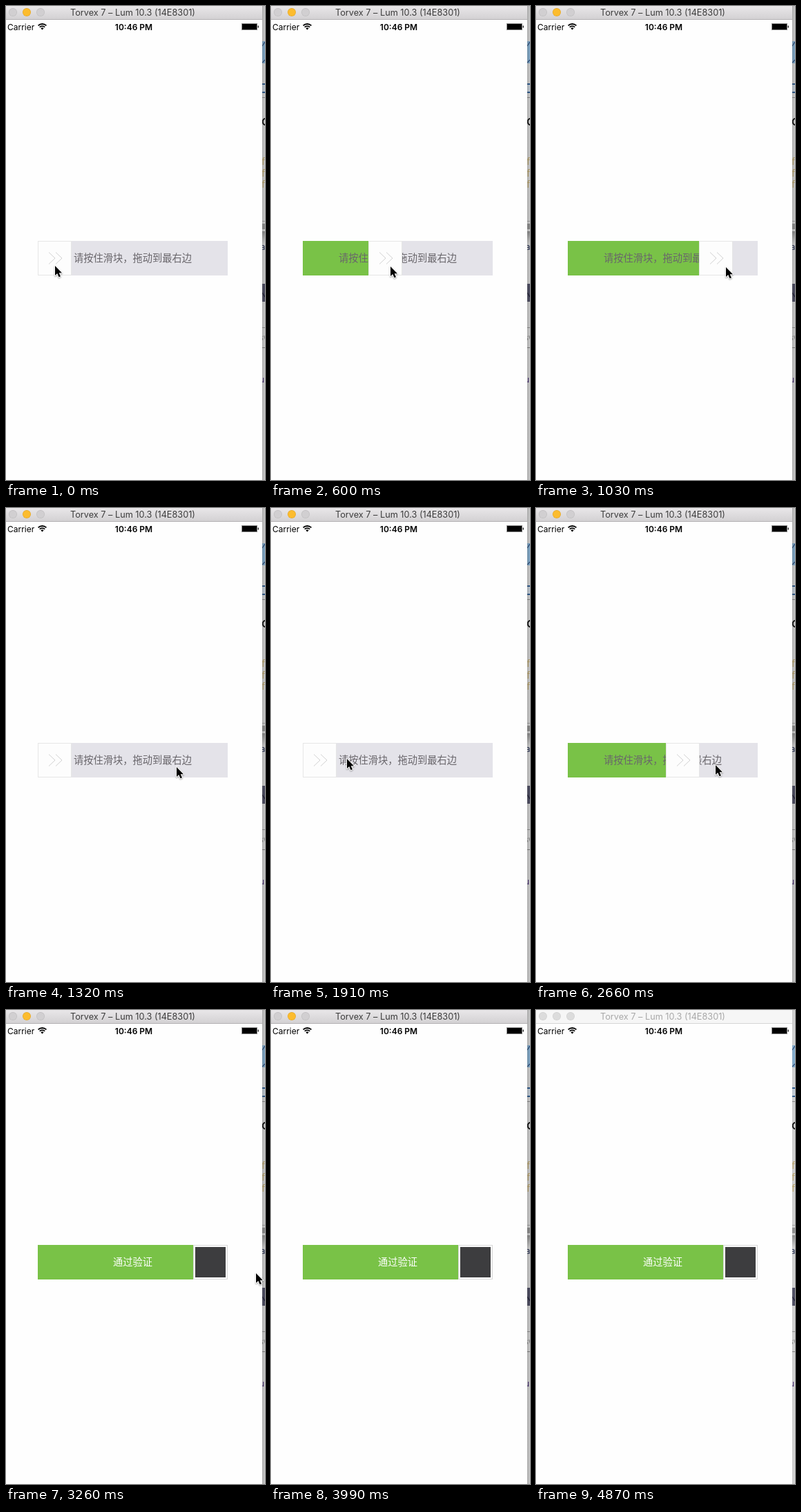
These frames come from a looping animation (375 by 686 pixels, 4.97 s). An HTML page with a canvas:

```html
<!DOCTYPE html>
<html lang="zh-CN">
<head>
<meta charset="utf-8">
<title>Slide to verify</title>
<style>
html, body { margin: 0; width: 100%; height: 100%; overflow: hidden; background: #fefefe; }
canvas { display: block; width: 375px; height: 686px; }
</style>
</head>
<body>
<canvas id="stage"></canvas>
<script>
const W = 375, H = 686, LOOP = 4970;
const canvas = document.getElementById('stage');
const ratio = window.devicePixelRatio || 1;
canvas.width = W * ratio;
canvas.height = H * ratio;
const ctx = canvas.getContext('2d');
ctx.scale(ratio, ratio);

const UI = 'Inter, Roboto, sans-serif';
const CJK = '"Noto Sans CJK SC", "Noto Sans CJK", sans-serif';
const TRACK = { x: 46, y: 340, w: 275, h: 50 };
const KNOB = 49, KNOB_END = 271;

// The screen refreshes in even beats; before the first one all is at rest.
const FIRST_BEAT = 286, BEAT = 147.6;
const LEAVE = 25, BLUR_AT = 4870;

// Turning points of each movement as [beat, position].
const KNOB_PATH = [[-1, 46], [5, 236], [7, 46], [13.2, 46], [18, KNOB_END]];
const POINTER_X = [[-1, 70], [5, 274], [13.2, 76], [18, 367], [20, 361], [23, 262], [24, 284]];
const POINTER_Y = [[-1, 375], [5, 377], [13.2, 359], [18, 378], [20, 380], [23, 582], [24, 662]];

const ease = p => (1 - Math.cos(Math.PI * p)) / 2;

function along(path, beat) {
  const i = path.findIndex(([b]) => b > beat);
  if (i < 0) return path[path.length - 1][1];
  const [b0, v0] = path[i - 1], [b1, v1] = path[i];
  return Math.round(v0 + (v1 - v0) * ease((beat - b0) / (b1 - b0)));
}

function rect(x, y, w, h, color) {
  ctx.fillStyle = color;
  ctx.fillRect(x, y, w, h);
}

function frame(x, y, w, h, color) {
  ctx.strokeStyle = color;
  ctx.lineWidth = 1;
  ctx.strokeRect(x + 0.5, y + 0.5, w - 1, h - 1);
}

function dot(x, y, r, color) {
  ctx.fillStyle = color;
  ctx.beginPath();
  ctx.arc(x, y, r, 0, Math.PI * 2);
  ctx.fill();
}

function text(str, x, y, font, color, align = 'left') {
  ctx.font = font;
  ctx.fillStyle = color;
  ctx.textAlign = align;
  ctx.fillText(str, x, y);
}

function line(points, color, width) {
  ctx.strokeStyle = color;
  ctx.lineWidth = width;
  ctx.beginPath();
  points.forEach(([x, y]) => ctx.lineTo(x, y));
  ctx.stroke();
}

function fade(x0, y0, x1, y1, from, to) {
  const g = ctx.createLinearGradient(x0, y0, x1, y1);
  g.addColorStop(0, from);
  g.addColorStop(1, to);
  return g;
}

// Sliver of the desktop to the right of the window.
function drawDesktop(active) {
  const band = (y, h, color) => rect(371, y, 4, h, color);
  ctx.save();
  ctx.beginPath();
  ctx.rect(371, 0, 4, H);
  ctx.clip();
  band(0, H, '#f4f4f4');
  band(51, 32, '#9ccbf0');
  line([[371, 58], [375, 52]], '#33558a', 1.2);
  line([[371, 82], [375, 78]], '#33558a', 1.2);
  band(112, 14, '#3a6ea8');
  band(114, 10, '#e4effa');
  band(132, 1, '#a0a0a0');
  text('C', 370, 173, `600 15px ${UI}`, '#111');
  for (let i = 0; i < 3; i++) text('f', 370, 230 + 16.5 * i, `14px ${UI}`, '#dcc07c');
  band(311, 1, '#bbb');
  band(315, 8, '#aaa');
  band(326, 18, fade(0, 326, 0, 344, '#a4a4a4', '#f4f4f4'));
  text('a', 369, 353, `11px ${UI}`, '#1d2a55');
  band(402, 26, '#606078');
  line([[371, 415], [375, 421]], '#303048', 1.5);
  band(465, 1, '#aaa');
  band(494, 1, '#999');
  text('sv', 367, 484, `11px ${UI}`, '#999');
  text('u', 367, 545, `12px ${UI}`, '#4a2c80');
  const shade = active ? 0.32 : 0.2;
  band(0, H, fade(371, 0, 375, 0, `rgba(0,0,0,${shade})`, `rgba(0,0,0,${shade / 2})`));
  ctx.restore();
}

function drawTitleBar(active) {
  rect(0, 0, 371, 19, active ? fade(0, 0, 0, 19, '#e9e7e9', '#d3d1d3') : '#f6f6f6');
  rect(0, 19, 371, 1, active ? '#b4b2b4' : '#d6d6d6');
  for (let i = 0; i < 3; i++) {
    const lit = active && i === 1, x = 10 + 20 * i;
    dot(x, 9, 6, lit ? '#e5a928' : active ? '#c0bec0' : '#d0d0d0');
    dot(x, 9, 5.3, lit ? '#fcbc2e' : active ? '#d1cfd1' : '#dcdcdc');
  }
  text('Torvex 7 – Lum 10.3 (14E8301)', 183.5, 14, `12.7px ${UI}`, active ? '#3c3c3c' : '#a8a8a8', 'center');
}

function drawStatusBar() {
  text('Carrier', 2, 34.5, `12px ${UI}`, '#000');
  const x = 52.5, y = 34.4, a = -Math.PI * 0.75, b = -Math.PI * 0.25;
  ctx.strokeStyle = '#000';
  ctx.lineWidth = 1.8;
  for (const r of [8.4, 5.3]) {
    ctx.beginPath();
    ctx.arc(x, y, r, a, b);
    ctx.stroke();
  }
  ctx.fillStyle = '#000';
  ctx.beginPath();
  ctx.moveTo(x, y);
  ctx.arc(x, y, 3, a, b);
  ctx.fill();
  text('10:46 PM', 185, 34.5, `600 12px ${UI}`, '#000', 'center');
  frame(341, 25, 23, 10, '#8c8c8c');
  rect(342, 26, 21, 8, '#000');
  rect(364.5, 28.5, 1.5, 3, '#333');
}

function drawSlider(x) {
  const { x: left, y, w, h } = TRACK;
  const done = x >= KNOB_END;
  const label = done ? '通过验证' : '请按住滑块\uff0c拖动到最右边';
  const size = done ? left + w - x : KNOB;
  rect(left, y, w, h, '#e4e3e9');
  rect(left, y, x - left, h, '#79c247');
  text(label, left + w / 2, 370.3, `14.25px ${CJK}`, done ? '#fff' : '#69666b', 'center');
  rect(x, y, size, h, '#fdfdfd');
  frame(x, y, size, h, done ? '#d9d9d9' : '#e6e6e6');
  if (done) {
    rect(x + 3, y + 3, 44, 44, '#3d3d3f');
    return;
  }
  for (const dx of [16, 26]) {
    line([[x + dx, y + 16.5], [x + dx + 9, y + 25], [x + dx, y + 33.5]], '#d2d2d2', 1);
  }
}

function drawPointer(x, y) {
  ctx.save();
  ctx.translate(x + 1, y + 1);
  ctx.beginPath();
  [[0, 0], [0, 14], [3.2, 11], [5.5, 16.3], [8, 15.2], [5.7, 10.2], [10, 10.2]]
    .forEach(([px, py]) => ctx.lineTo(px, py));
  ctx.closePath();
  ctx.shadowColor = 'rgba(0,0,0,0.35)';
  ctx.shadowBlur = 2 * ratio;
  ctx.shadowOffsetY = ratio;
  ctx.lineWidth = 2;
  ctx.lineJoin = 'round';
  ctx.strokeStyle = '#fff';
  ctx.stroke();
  ctx.shadowColor = 'transparent';
  ctx.fillStyle = '#000';
  ctx.fill();
  ctx.restore();
}

function draw(now) {
  const t = now % LOOP;
  const beat = Math.max(-1, Math.floor((t - FIRST_BEAT) / BEAT));
  const active = t < BLUR_AT;
  rect(0, 0, W, H, '#fefefe');
  drawDesktop(active);
  drawTitleBar(active);
  drawStatusBar();
  drawSlider(along(KNOB_PATH, beat));
  if (beat < LEAVE) drawPointer(along(POINTER_X, beat), along(POINTER_Y, beat));
}

const start = performance.now();
function tick() {
  draw(performance.now() - start);
  requestAnimationFrame(tick);
}
tick();
</script>
</body>
</html>
```
